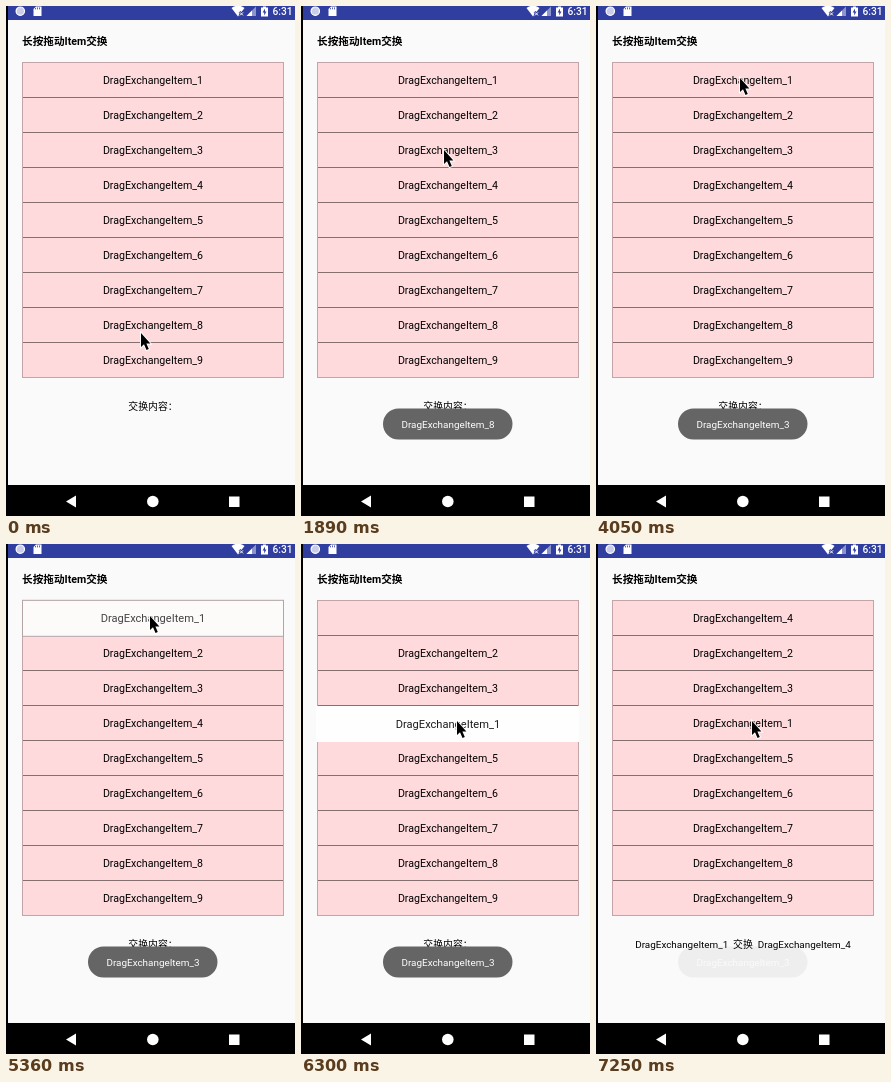
Write an HTML page that moves like this. It is 289 by 510 pixels and loops after 8 s.

```html
<!DOCTYPE html>
<html lang="zh-CN">
<head>
<meta charset="utf-8">
<style>
  html, body { margin: 0; width: 100%; height: 100%; overflow: hidden; background: #000; }
  svg { display: block; width: 289px; height: 510px; }
  text { font: 10.65px Roboto, 'Noto Sans CJK SC', 'Noto Sans CJK', sans-serif; white-space: pre; }
  .mid { text-anchor: middle; }
  .small { font-size: 9.9px; }
  .title { font-weight: 700; }
  .clock { font-size: 10.2px; font-weight: 500; }
  .lifted { font-size: 11.1px; }
</style>
</head>
<body>
<svg viewBox="0 0 289 510">
  <rect x="2" width="287" height="479" fill="#fafafa"/>
  <rect x="2" width="287" height="14" fill="#303f9f"/>

  <!-- status bar -->
  <g fill="#fff" transform="translate(0 .4)">
    <circle cx="14.3" cy="4.8" r="4.2" fill="#c9cdea" stroke="#fff" stroke-width="1.2"/>
    <path d="M30 0H35.5V9.5H27.5V2.5z"/>
    <path d="M29.5 3V1.5M31.5 3V1M33.5 3V1" stroke="#303f9f" stroke-width=".8"/>
    <path d="M225.5 1.5Q232 -3 238.5 1.5L232 10z"/>
    <path d="M233.5 5.5l4 4m0-4l-4 4" stroke="#303f9f" stroke-width="2.6"/>
    <path d="M234 6l3 3m0-3l-3 3" stroke="#fff"/>
    <path d="M250 0V9.5H240.5z" opacity=".45"/>
    <path d="M246 4V9.5H240.5z"/>
    <path d="M255 1H257V0H260V1H262V10H255z"/>
    <path d="M259 2L256.6 6H258.2V9L260.5 5H259z" fill="#303f9f"/>
    <text class="clock" x="266.5" y="8.7">6:31</text>
  </g>

  <text class="title" x="16" y="39">长按拖动Item交换</text>

  <!-- list -->
  <rect x="16.5" y="56.5" width="261" height="315" fill="#ffdadd" stroke="#c3a5a7"/>
  <path id="lines" stroke="#86706f"/>
  <g id="list"></g>

  <text id="result" class="mid small" x="147" y="404"></text>

  <g id="drag">
    <rect id="card" height="36"/>
    <text class="mid lifted" x="147" y="22">DragExchangeItem_1</text>
  </g>

  <g id="toast">
    <rect x="82" y="402.5" width="129.5" height="31" rx="15.5" fill="#656565"/>
    <text class="mid small" x="147" y="422" fill="#fff">DragExchangeItem_<tspan id="digit"></tspan></text>
  </g>

  <!-- navigation bar -->
  <path d="M60 495.5L70 489.5V501.5zM223 490.5H233.5V501H223z" fill="#fff"/>
  <circle cx="146.8" cy="495.5" r="5.8" fill="#fff"/>

  <path id="cursor" d="M1 0V14L4 11.3L6.5 17L8.8 16L6.4 10.5H10.4z" stroke="#fff" stroke-width="1.8" paint-order="stroke"/>
</svg>
<script>
const $ = id => document.getElementById(id);
const LOOP = 8000, STEP = 118.9, LEAD = 15;
const item = n => 'DragExchangeItem_' + n;
const ramp = (k, a, b) => Math.min(1, Math.max(0, (k - a) / (b - a)));

function set(id, attrs) {
  for (const name in attrs) $(id).setAttribute(name, attrs[name]);
}

// pointer stops: step, x, y
const stops = [
  [2, 134, 327], [4, 133, 322], [10, 133, 322], [14, 135, 162], [16, 142, 144],
  [29, 142, 144], [34, 143, 72], [47, 143, 72], [50, 141, 131], [53, 155, 177]
];

function pointer(k) {
  let [, x, y] = stops[0];
  for (let i = 1; i < stops.length; i++) {
    const [a, x0, y0] = stops[i - 1], [b, x1, y1] = stops[i], u = ramp(k, a, b);
    x += (x1 - x0) * u;
    y += (y1 - y0) * u;
  }
  return `translate(${Math.round(x)} ${Math.round(y)})`;
}

let lines = '';
for (let i = 0; i < 9; i++) {
  const y = 56 + 35 * i;
  if (i) lines += `M17 ${y + .5}H277`;
  $('list').insertAdjacentHTML('beforeend', `<text class="mid" x="147" y="${y + 21.8}"></text>`);
}
set('lines', { d: lines });
const rows = [...$('list').children];

function draw(now) {
  const k = Math.floor((now % LOOP + LEAD) / STEP);
  const swapped = k >= 57, held = k >= 45 && !swapped, moving = k >= 48;

  const order = [1, 2, 3, 4, 5, 6, 7, 8, 9];
  if (swapped) [order[0], order[3]] = [4, 1];
  rows.forEach((row, i) => row.textContent = held && !i ? '' : item(order[i]));
  $('result').textContent = swapped ? `${item(1)}  交换  ${item(4)}` : '交换内容：';

  // the lifted row trails the pointer slightly
  const y = 56.3 + 105.7 * ramp(k, 47, 53) ** 1.1;
  set('drag', {
    visibility: held ? 'visible' : 'hidden',
    transform: `translate(0 ${y})`,
    fill: moving ? '#1c1c1c' : '#444'
  });
  set('card', moving
    ? { x: 15, width: 263, fill: '#fefefe', stroke: 'none' }
    : { x: 16.5, width: 261, fill: '#fdfafa', stroke: '#b3a5a6' });

  set('toast', { opacity: ramp(k, 7, 10) - .93 * ramp(k, 58, 61) });
  $('digit').textContent = k < 26 ? 8 : 3;

  set('cursor', { transform: pointer(k) });
}

const start = performance.now();
function tick() {
  draw(performance.now() - start);
  requestAnimationFrame(tick);
}
tick();
</script>
</body>
</html>
```
